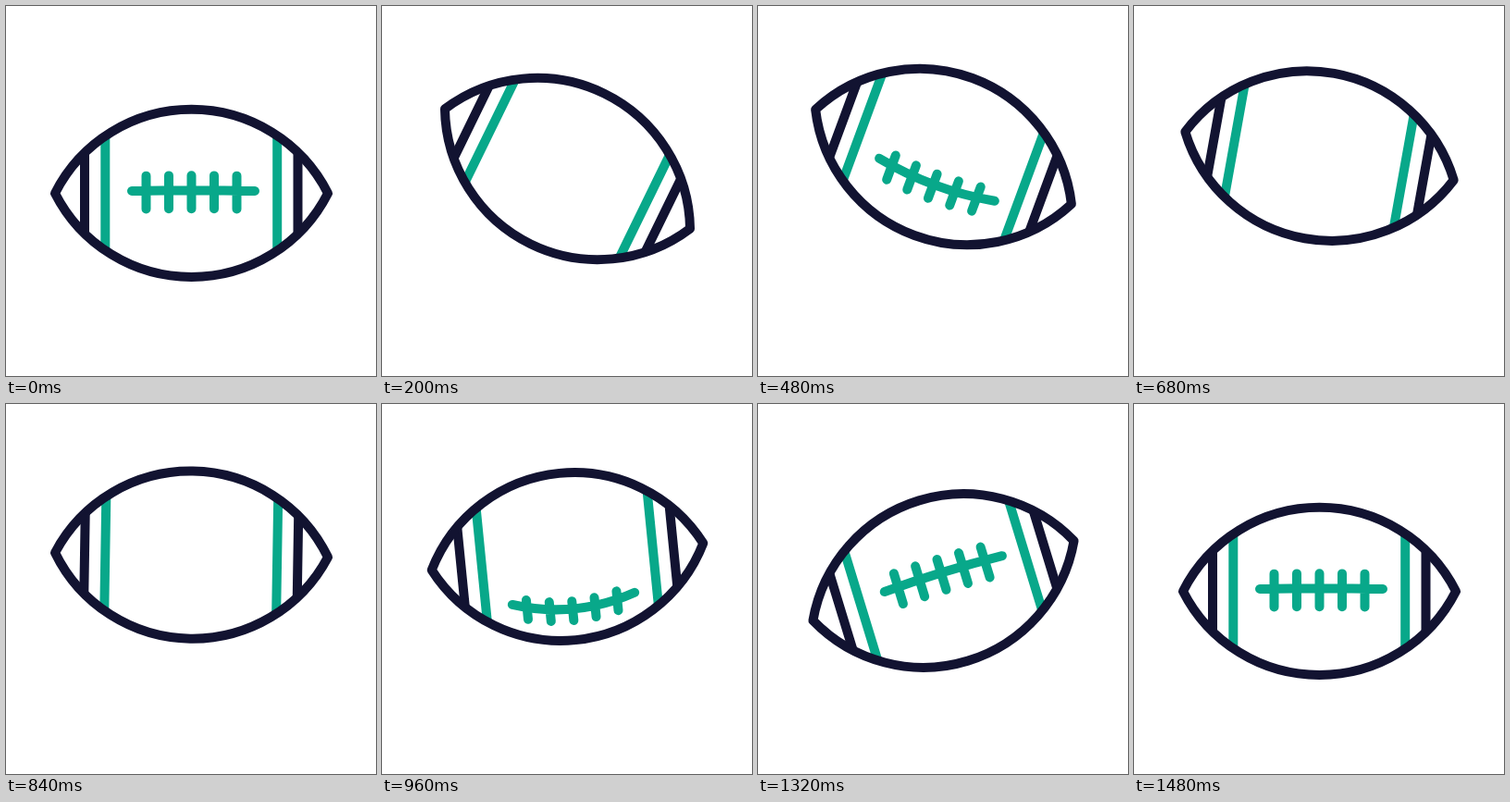
Animation, 400 px wide and 400 px high, one loop 1560 ms. Source, as an HTML page:

```html
<!DOCTYPE html>
<html lang="en">
<head>
<meta charset="utf-8">
<title>Football</title>
<style>
  html, body { margin: 0; width: 100%; height: 100%; overflow: hidden; background: #fff; }
  svg { display: block; width: 100%; height: 100%; }
  path { fill: none; stroke-width: 10; stroke-linejoin: round; }
  .green { stroke: #08a88a; }
  .navy { stroke: #121331; }
  #lace { stroke-linecap: round; }
</style>
</head>
<body>
<svg viewBox="0 0 400 400">
  <defs>
    <clipPath id="inside">
      <path d="M-147.5 0A165.4 165.4 0 0 1 147.5 0A165.4 165.4 0 0 1 -147.5 0Z"/>
    </clipPath>
  </defs>
  <g id="ball">
    <g clip-path="url(#inside)">
      <path id="lace" class="green"/>
      <path class="green" d="M-93.2 -70V70M92.7 -70V70"/>
      <path class="navy" d="M-115.5 -60V60M115 -60V60"/>
    </g>
    <path class="navy" d="M-147.5 0A165.4 165.4 0 0 1 147.5 0A165.4 165.4 0 0 1 -147.5 0Z"/>
  </g>
</svg>
<script>
const LOOP = 1560, STEP = 40, END = 1480;
const ball = document.getElementById('ball');
const lace = document.getElementById('lace');

// Keys: time in ms, value, slope per ms
const height = [
  [0, 202.4, 0], [200, 176, -.1], [480, 163, -.012], [620, 162, 0], [960, 165, .02],
  [1120, 170.5, .06], [1320, 191, .115], [1480, 202.4, 0]
];
const tilt = [[0, 0, 0], [215, 26.4, 0], [1335, -17, 0], [1480, 0, 0]];
const spin = [[0, 2.1, .6], [480, 338, .78], [960, 678, .4], [1320, 726, 0], [1480, 722.1, 0]];

function sample(keys, t) {
  let i = 0;
  while (i < keys.length - 2 && t >= keys[i + 1][0]) i++;
  const [t0, a, m] = keys[i], [t1, b, n] = keys[i + 1];
  const d = t1 - t0, u = (t - t0) / d, v = 1 - u;
  return v * v * (1 + 2 * u) * a + u * u * (3 - 2 * u) * b + u * v * d * (v * m - u * n);
}

// The lace lies on the curved surface, so it bows and shortens near the edge
function lacePath(deg) {
  const a = deg * Math.PI / 180;
  if (Math.cos(a) < 0) return '';
  const y = -85 * Math.sin(a);
  const at = x => y * (1 - .195 * (x / 66.5) ** 2);
  const half = 18.4 * (1 - .0076 * Math.abs(y));
  const end = at(66.5);
  let d = `M-64.5 ${end}Q2 ${2 * y - end} 68.5 ${end}`;
  for (let k = -2; k <= 2; k++) {
    const x = k * 24.5, mid = at(x) + 2;
    d += `M${x} ${mid - half}V${mid + half}`;
  }
  return d;
}

function draw(now) {
  const t = Math.min(Math.floor(now % LOOP / STEP) * STEP, END);
  ball.setAttribute('transform', `translate(200.5 ${sample(height, t)}) rotate(${sample(tilt, t)})`);
  lace.setAttribute('d', lacePath(sample(spin, t)));
}

const start = performance.now();
function tick() {
  draw(performance.now() - start);
  requestAnimationFrame(tick);
}
tick();
</script>
</body>
</html>
```
